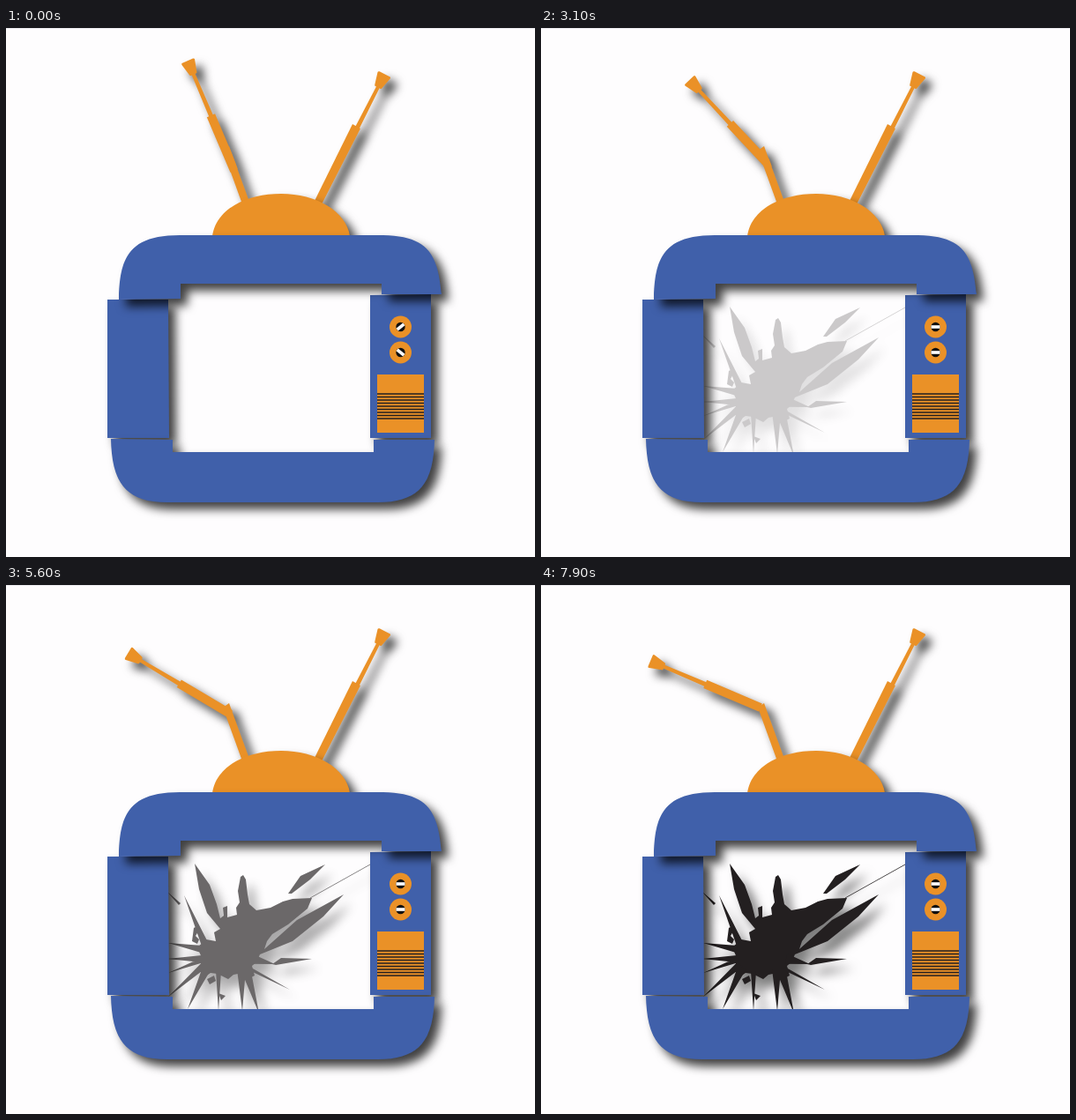
These frames come from a looping animation (600x600 px, 8000 ms). An HTML page:

```html
<!DOCTYPE html>
<html lang="en">
<head>
<meta charset="utf-8">
<title>Broken television</title>
<style>
  html, body { margin: 0; width: 100%; height: 100%; overflow: hidden; background: #fefdfe; }
  svg { display: block; width: 100vw; height: 100vh; }
  .blue { fill: #4060aa; }
  .orange { fill: #ea9127; }
  .ink { fill: #231f20; }
  .shadow { filter: url(#drop); }
</style>
</head>
<body>
<svg viewBox="0 0 600 600">
  <defs>
    <filter id="drop" filterUnits="userSpaceOnUse" x="0" y="0" width="600" height="600" color-interpolation-filters="sRGB">
      <feDropShadow dx="8" dy="8" stdDeviation="5.5" flood-color="#000" flood-opacity=".75"/>
    </filter>
    <filter id="soft" filterUnits="userSpaceOnUse" x="0" y="0" width="600" height="600" color-interpolation-filters="sRGB">
      <feDropShadow dx="9" dy="11" stdDeviation="6" flood-color="#000" flood-opacity=".5"/>
    </filter>
    <clipPath id="elbow"><path d="M0 0H206L276 197H0Z"/></clipPath>
    <g id="rod">
      <path d="M-6.5-6H6.5L3 8H-3Z" stroke="#ea9127" stroke-width="3" stroke-linejoin="round"/>
      <path d="M-2 8H2L2.5 61H-2.5Z"/>
    </g>
    <g id="knob">
      <circle class="orange" r="12.5"/>
      <circle r="5.2" fill="#111"/>
    </g>
  </defs>

  <rect width="600" height="1" fill="#ebeaee"/>

  <g id="crack" class="ink" opacity="0">
    <g filter="url(#soft)">
      <path d="M214 316L231 340L239 362L243 378L247 375L246 366L251 364L251 377L262 374L261 366L265 360L263 347L266 331L269 329L272 334L274 351L276 362L284 369L300 366L314 359L325 356L347 355L342 367L320 385L302 396L296 404L293 413L330 380L383 351L360 376L325 404L288 419L284 428L279 432L282 443L274 447L268 440L258 442L252 447L240 441L232 440L226 444L218 436L223 425L217 411L227 402L238 404L236 394L243 390L228 372L219 345Z"/>
      <path d="M320 350L334 330L362 317L345 334L324 350ZM302 430L312 423L347 424L306 431Z"/>
      <path d="M228 447L236 443L238 449L231 453ZM241 463L249 466L244 471ZM213 389Q218 386 218 393L215 398L219 402L217 407L211 404Z"/>
      <path d="M345 355L413 317" stroke="#231f20" stroke-width=".8"/>
      <path id="spikes"/>
    </g>
  </g>

  <g class="orange shadow">
    <g clip-path="url(#elbow)">
      <g id="arm">
        <use href="#rod"/>
        <path d="M-5 60H5V128H-5Z"/>
      </g>
    </g>
    <path d="M246 139L253 134L276 197H267Z"/>
  </g>
  <g class="orange shadow">
    <g transform="translate(426 59) rotate(27)"><use href="#rod"/></g>
    <path d="M393 109L402 114L358 200L350 196Z"/>
  </g>
  <path class="orange shadow" d="M234 236C238 206 272 188 312 188C352 188 386 208 390 236Z"/>

  <path class="blue shadow" d="M115 308H184L185 465H115Z"/>
  <g class="shadow">
    <path class="blue" d="M413 303L482 302V465H413Z"/>
  </g>
  <rect class="orange" x="421" y="393" width="53" height="66"/>
  <path id="grille" stroke="#231f20" stroke-width="1.4"/>
  <g transform="translate(447.5 339)">
    <use href="#knob"/><rect class="dial" x="-5" y="-1.8" width="10" height="3.6" fill="#fff"/>
  </g>
  <g transform="translate(447.5 368)">
    <use href="#knob"/><rect class="dial" x="-5" y="-1.8" width="10" height="3.6" fill="#fff"/>
  </g>

  <path class="blue shadow" d="M119 466L189 467V481H417V467H486C485 515 470 538 422 538H182C133 538 120 512 119 466Z"/>
  <path class="blue shadow" d="M128 308C129 262 138 235 197 235H428C480 236 490 258 494 302H426V290H198V307Z"/>
</svg>
<script>
  const LOOP = 8000, STEP = 100;
  const $ = id => document.getElementById(id);
  const clamp = v => Math.min(1, Math.max(0, v));
  const part = (t, from, to) => clamp((t - from) / (to - from));
  const mix = (a, b, p) => a + (b - a) * p;

  // Each spike: tip x, tip y, base x, base y, base width
  const spikes = [
    [202, 352, 225, 406, 8], [183, 348, 197, 362, 3], [184, 406, 222, 413, 8],
    [183, 424, 222, 424, 8], [184, 440, 224, 425, 6], [184, 467, 226, 430, 8],
    [206, 481, 228, 434, 10], [241, 483, 241, 438, 6], [268, 483, 267, 436, 10],
    [287, 486, 272, 436, 11], [322, 459, 276, 435, 4], [305, 430, 278, 424, 12]
  ];
  const triangle = ([x, y, bx, by, w]) => {
    const d = Math.hypot(x - bx, y - by);
    const nx = (by - y) / d * w / 2, ny = (x - bx) / d * w / 2;
    return `M${x} ${y}L${bx + nx} ${by + ny}L${bx - nx} ${by - ny}Z`;
  };
  $('spikes').setAttribute('d', spikes.map(triangle).join(''));

  const lines = Array.from({ length: 9 }, (_, i) => `M421 ${415 + i * 3.5}H474`);
  $('grille').setAttribute('d', lines.join(''));

  const dials = document.querySelectorAll('.dial');

  function draw(t) {
    const fall = part(t, 0, 6800);
    $('arm').setAttribute('transform',
      `translate(${mix(209, 131, fall)} ${mix(44, 89, fall)}) rotate(${mix(-23, -67, fall)})`);

    const turn = mix(40, 0, part(t, 0, 1800));
    dials[0].setAttribute('transform', `rotate(${-turn})`);
    dials[1].setAttribute('transform', `rotate(${turn})`);

    $('crack').setAttribute('opacity', part(t, 1800, 7500));
  }

  let last = -1;
  function tick() {
    const t = Math.floor(performance.now() % LOOP / STEP) * STEP;
    if (t !== last) draw(last = t);
    requestAnimationFrame(tick);
  }
  tick();
</script>
</body>
</html>
```
